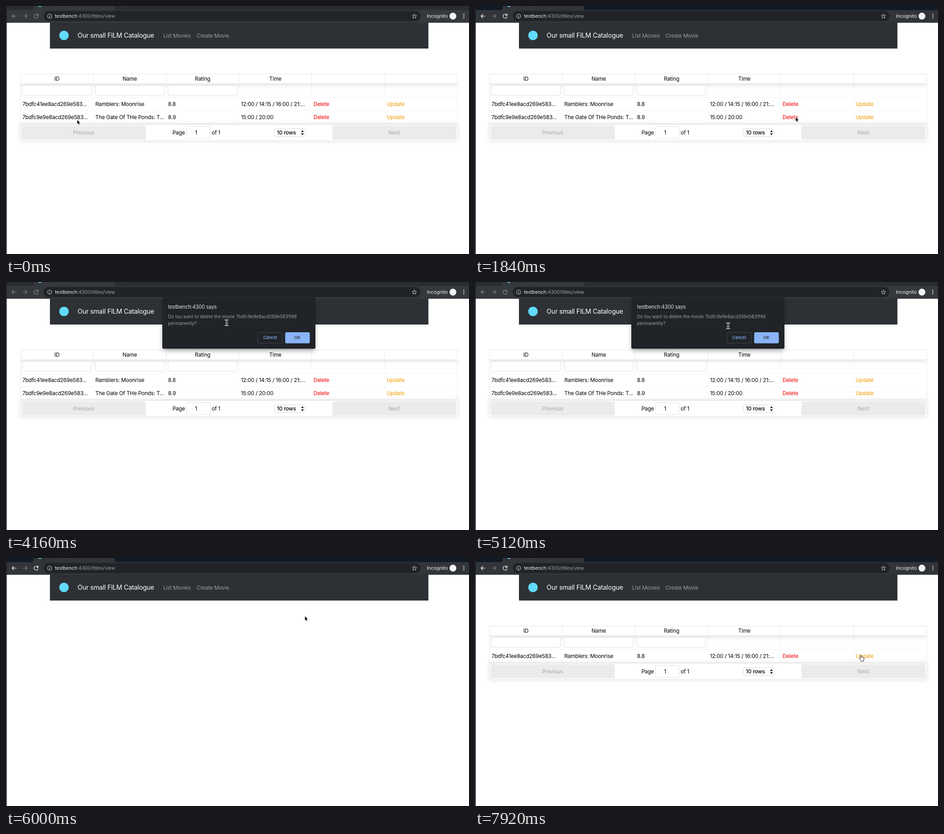
An HTML page for the animation above (8000 ms loop, 1022 px wide and 548 px high).

```html
<!DOCTYPE html>
<html lang="en">
<head>
<meta charset="utf-8">
<title>Movie list</title>
<style>
  html, body { margin: 0; width: 100%; height: 100%; overflow: hidden; background: #fff; }
  svg { display: block; width: 100vw; height: 100vh; }
  text { font: 11.8px Inter, "Open Sans", sans-serif; letter-spacing: -.015em; white-space: pre; }
  .mid { text-anchor: middle; }
  .url { font-size: 10.8px; }
  .small { font-size: 9.8px; letter-spacing: 0; }
  .button { font-size: 9.2px; font-weight: 500; letter-spacing: 0; }
  .line { fill: none; stroke-linecap: round; stroke-linejoin: round; }
</style>
</head>
<body>
<svg id="stage" viewBox="0 0 1022 548" preserveAspectRatio="none">
  <defs>
    <filter id="blur" x="-20%" y="-100%" width="140%" height="300%"><feGaussianBlur stdDeviation="6"/></filter>
    <clipPath id="tableClip"><rect x="32" y="150" width="965" height="60"/></clipPath>
  </defs>
  <rect width="1022" height="548" fill="#fff"/>

  <g id="table">
    <g clip-path="url(#tableClip)">
      <rect x="32" y="151.6" width="965" height="21.6" opacity=".15" filter="url(#blur)"/>
      <rect x="32" y="150" width="965" height="21.6" fill="#fff"/>
    </g>
    <g id="grid"></g>
    <g id="rows"></g>
    <g id="pager">
      <rect x="32" y="261" width="965" height="37" opacity=".1" filter="url(#blur)"/>
      <rect x="32" y="261" width="965" height="37" fill="#fff"/>
      <rect x="32" y="260.4" width="965" height="1.6" fill="#e2e2e2"/>
      <rect x="34.5" y="263.8" width="274" height="31.6" rx="2.4" fill="#ebebeb"/>
      <rect x="720.3" y="263.8" width="274" height="31.6" rx="2.4" fill="#ebebeb"/>
      <text class="mid" x="171.5" y="284" fill="#a8a8a8">Previous</text>
      <text class="mid" x="857" y="284" fill="#a8a8a8">Next</text>
      <text x="367.5" y="284">Page</text>
      <rect x="398.5" y="266.5" width="52" height="26.5" rx="2.4" fill="#fff" stroke="#dedede" stroke-width=".9"/>
      <text class="mid" x="419.5" y="284">1</text>
      <text x="454" y="284">of 1</text>
      <rect x="591.8" y="271.4" width="68.6" height="17.2" rx="4" fill="#fff" stroke="#d4d4d4" stroke-width=".9"/>
      <text x="598" y="284" font-weight="500" style="font-weight:500">10 rows</text>
      <path d="M651.4 278.6L654.4 274.6L657.4 278.6ZM651.4 281.4L654.4 285.4L657.4 281.4Z"/>
    </g>
    <rect id="frame" x="32" y="150" width="965" height="148" fill="none" stroke="#000" stroke-opacity=".11" stroke-width=".9"/>
  </g>

  <rect x="97" y="37" width="835.4" height="57" fill="#2d3135"/>
  <circle cx="128" cy="65" r="10.5" fill="#61dafb"/>
  <text x="158" y="70.4" fill="#fff" style="font-size:14.3px">Our small FILM Catalogue</text>
  <text x="347" y="69.8" fill="#999b9d">List Movies</text>
  <text x="420.5" y="69.8" fill="#999b9d">Create Movie</text>

  <g id="chrome">
    <rect id="strip" width="1022" height="10"/>
    <rect id="bar" y="9" width="1022" height="28"/>
    <path id="tab" d="M55 9.5Q61 9 61 3V0H240V3Q240 9 246 9.5Z"/>
    <circle cx="75" cy="-3" r="5" fill="#61dafb"/>
    <text x="86" y="-1" fill="#c5c8cb" class="small">Movie app</text>
    <path d="M257 -3V1" stroke="#9aa0a6"/>
    <rect x="83" y="11" width="832" height="22.5" rx="11.2" fill="#202327"/>
    <g class="line" stroke-width="1.35">
      <path class="nav" d="M22 22.3H13.4M17.3 18.2L13.2 22.3L17.3 26.4"/>
      <path d="M37.6 22.3H46.2M42.3 18.2L46.4 22.3L42.3 26.4" stroke="#74787c"/>
      <path class="nav" d="M70.2 19.8A4.5 4.5 0 1 0 70.8 23.6M70.9 17.5V20.7H67.7"/>
      <circle cx="96.4" cy="22.4" r="4.6" stroke="#d3d6d9" stroke-width="1.1"/>
      <path d="M96.4 22.2V24.7M96.4 20.1V20.2" stroke="#d3d6d9" stroke-width="1.1"/>
      <path id="star" stroke="#c9ccd0" stroke-width="1"/>
    </g>
    <text class="url" x="108" y="26.2" fill="#9aa0a6"><tspan fill="#e8eaed">testbench</tspan>:4300/titles/view</text>
    <text class="url" x="929" y="26.2" fill="#e8eaed">Incognito</text>
    <circle cx="986.5" cy="22.3" r="7.6" fill="#f1f3f4"/>
    <g fill="#d8dadd"><circle cx="1010.6" cy="18.2" r="1.2"/><circle cx="1010.6" cy="22.3" r="1.2"/><circle cx="1010.6" cy="26.4" r="1.2"/></g>
  </g>
  <rect width="1.6" height="548" fill="#1d2128"/>

  <g id="dialog">
    <rect x="347" y="40" width="334" height="111" opacity=".36" filter="url(#blur)"/>
    <rect x="345" y="34.5" width="338" height="113" rx="3" fill="#202327"/>
    <text x="357.8" y="58.6" fill="#e3e5e8" style="font-size:11.1px">testbench:4300 says</text>
    <g fill="#9aa0a6">
      <text class="small" x="357.8" y="80.4">Do tou want to delete the movie 7bdfc9e9e8acd269e5831f46</text>
      <text class="small" x="357.8" y="95.3">permanently?</text>
    </g>
    <rect x="556.2" y="111.4" width="54" height="23.6" rx="3" fill="none" stroke="#474c53" stroke-width=".9"/>
    <text class="button mid" x="583" y="126.4" fill="#8ab4f8">Cancel</text>
    <rect x="616.2" y="111" width="54.4" height="24.4" rx="3" fill="#8ab4f8"/>
    <text class="button mid" x="643.2" y="126.4" fill="#202327">OK</text>
  </g>

  <g id="cursor">
    <path id="arrow" d="M0 0V10.6L2.4 8.4L4 12L5.9 11.2L4.3 7.7H7.6Z" stroke="#fff" stroke-width=".8"/>
    <g id="beam" class="line">
      <path d="M-3 -6Q0 -6 0 -4Q0 -6 3 -6M0 -4V4M-3 6Q0 6 0 4Q0 6 3 6M-1.5 1H1.5" stroke="#fff" stroke-width="2.4"/>
      <path d="M-3 -6Q0 -6 0 -4Q0 -6 3 -6M0 -4V4M-3 6Q0 6 0 4Q0 6 3 6M-1.5 1H1.5" stroke="#000" stroke-width=".9"/>
    </g>
    <path id="hand" d="M4.6 11.5V5.2Q4.6 4 5.7 4T6.8 5.2V8.6Q7.8 7.6 8.8 8.9Q9.8 8 10.8 9.3Q12.4 8.7 12.6 10.3V13.3L11.4 16.2V17.8H6.3V16.4L2.7 12.3Q2.2 11 3.3 10.8Z" fill="#fff" stroke="#000" stroke-width=".9" stroke-linejoin="round"/>
  </g>
</svg>
<script>
const LOOP = 8000, STEP = 80, ROW_HEIGHT = 29.2;
const $ = id => document.getElementById(id);

function add(parent, tag, attrs, content = "") {
  const node = document.createElementNS("http://www.w3.org/2000/svg", tag);
  for (const name in attrs) node.setAttribute(name, attrs[name]);
  node.textContent = content;
  parent.append(node);
  return node;
}

const columns = [32, 193, 353.6, 514.5, 674.6, 836, 997];
["ID", "Name", "Rating", "Time"].forEach((label, i) =>
  add($("grid"), "text", { class: "mid", x: (columns[i] + columns[i + 1]) / 2, y: 165 }, label));

const rule = (x1, y1, x2, y2, opacity) =>
  add($("grid"), "path", { d: `M${x1} ${y1}L${x2} ${y2}`, stroke: "#000", "stroke-opacity": opacity, "stroke-width": .9 });
rule(32, 171.8, 997, 171.8, .06);
rule(32, 202.3, 997, 202.3, .06);
columns.slice(1, -1).forEach(x => {
  rule(x, 150, x, 172, .1);
  rule(x, 172, x, 202, .05);
});
columns.slice(0, 3).forEach(x =>
  add($("grid"), "rect", { x: x + 4.3, y: 175.4, width: 152, height: 22, rx: 2.4, fill: "#fff", stroke: "#dcdcdc", "stroke-width": .9 }));

const movies = [
  ["7bdfc41ee8acd269e583...", "Ramblers: Moonrise", "8.8", "12:00 / 14:15 / 16:00 / 21:..."],
  ["7bdfc9e9e8acd269e583...", "The Gate Of THe Ponds: T...", "8.9", "15:00 / 20:00"]
];
const rows = movies.map((movie, r) => {
  const row = add($("rows"), "g", { transform: `translate(0 ${r * ROW_HEIGHT})` });
  [...movie, "Delete", "Update"].forEach((value, i) => {
    const fill = i == 4 ? "#ef0000" : i == 5 ? "#ef9c00" : "#000";
    add(row, "text", { x: columns[i] + 4.2, y: 221, fill }, value);
    if (i) add(row, "path", { d: `M${columns[i]} 202V231`, stroke: "#000", "stroke-opacity": .025 });
  });
  add(row, "path", { d: "M32 231.5H997", stroke: "#000", "stroke-opacity": .05, "stroke-width": .9 });
  return row;
});

$("star").setAttribute("d", "M" + Array.from({ length: 10 }, (_, i) => {
  const radius = i % 2 ? 2.3 : 5.2, angle = (i / 5 - .5) * Math.PI;
  return `${901.5 + radius * Math.cos(angle)} ${22.7 + radius * Math.sin(angle)}`;
}).join("L") + "Z");

// Keys are [time, ...values].
const mousePath = [
  [0, 157, 251], [320, 861, 248], [480, 267, 247], [640, 267, 247],
  [1200, 710, 252], [1360, 710, 252], [1680, 707.5, 245], [1840, 707.5, 245],
  [2480, 704.5, 248.5], [2720, 704.5, 248.5], [3600, 187, 270],
  [4160, 487, 90], [4480, 861, 231], [5200, 548, 92], [5360, 600, 106],
  [5600, 659, 128], [6000, 659.5, 128], [6080, 575, 190], [6240, 575, 190],
  [6480, 400, 50], [6640, 181, 135], [6960, 181, 135], [7280, 320, 280],
  [7840, 846, 210.5]
];
const dialogPath = [
  [2160, 0], [2320, .5], [2400, .88], [2480, .97], [2800, 1],
  [5600, 1], [5680, .95], [5760, .8], [5840, .4], [5920, 0]
];

function sample(keys, t) {
  const next = keys.findIndex(key => key[0] > t);
  if (next < 0) return keys.at(-1).slice(1);
  if (!next) return keys[0].slice(1);
  const a = keys[next - 1], b = keys[next];
  const k = (t - a[0]) / (b[0] - a[0]), eased = k * k * (3 - 2 * k);
  return a.slice(1).map((value, i) => value + (b[i + 1] - value) * eased);
}

const show = (node, visible) => node.style.display = visible ? "" : "none";

function render(time) {
  const t = Math.floor(time % LOOP / STEP) * STEP;

  const inactive = t < 1440 || (t >= 2240 && t < 5920);
  const barColor = inactive ? "#35383c" : "#313539";
  $("strip").setAttribute("fill", inactive ? "#282d32" : "#111b25");
  $("bar").setAttribute("fill", barColor);
  $("tab").setAttribute("fill", barColor);
  document.querySelectorAll(".nav").forEach(n => n.setAttribute("stroke", inactive ? "#85898d" : "#eceef0"));

  const deleted = t >= 6080;
  const lift = deleted ? ROW_HEIGHT : 0;
  show($("table"), t < 6000 || deleted);
  show(rows[1], !deleted);
  $("pager").setAttribute("transform", `translate(0 ${-lift})`);
  $("frame").setAttribute("height", 148 - lift);

  const [open] = sample(dialogPath, t), away = 1 - open;
  show($("dialog"), open > 0);
  $("dialog").setAttribute("opacity", open > .96 ? 1 : open);
  $("dialog").setAttribute("transform",
    `translate(514 ${91 - away * 16}) scale(${1 - away * .05} 1) translate(-514 -91)`);

  const [x, y] = sample(mousePath, t);
  const overText = open > .9 && x > 356 && x < 648 && y > 70 && y < 98;
  const overLink = t >= 7920;
  $("cursor").setAttribute("transform", `translate(${x} ${y})`);
  show($("beam"), overText);
  show($("hand"), overLink);
  show($("arrow"), !overText && !overLink);
}

const start = performance.now();
function tick() {
  render(performance.now() - start);
  requestAnimationFrame(tick);
}
tick();
</script>
</body>
</html>
```
